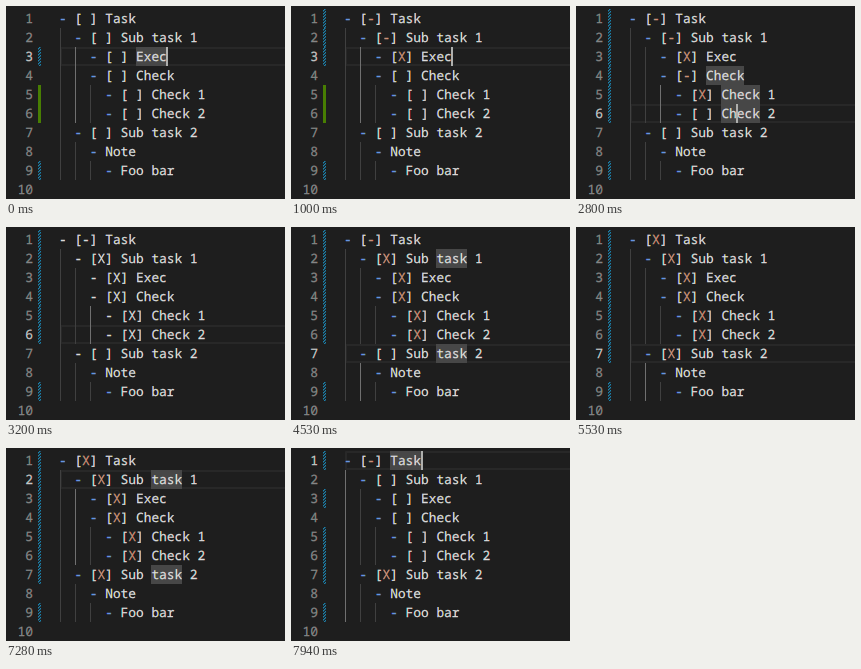
These frames come from a looping animation (279x193 px, 8000 ms). An HTML page with a canvas:

```html
<!DOCTYPE html>
<html lang="en">
<head>
<meta charset="utf-8">
<title>Task list</title>
<style>
  html, body { margin: 0; width: 100%; height: 100%; overflow: hidden; background: #1e1e1e; }
  canvas { display: block; }
</style>
</head>
<body>
<canvas id="stage" width="279" height="193"></canvas>
<script>
const ctx = document.getElementById('stage').getContext('2d');
const LOOP = 8000, W = 279, H = 193;
const TOP = 3, LINE = 19, LEFT = 52.6, CHAR = 7.7;
const INK = [220, 220, 220], BULLET = [103, 150, 230], MARK = [206, 145, 120];
const NUMBER = [133, 133, 133], CURRENT = [198, 198, 198];

// [indent, text, has checkbox]
const lines = [
  [0, 'Task', true],
  [2, 'Sub task 1', true],
  [4, 'Exec', true],
  [4, 'Check', true],
  [6, 'Check 1', true],
  [6, 'Check 2', true],
  [2, 'Sub task 2', true],
  [4, 'Note', false],
  [6, 'Foo bar', false]
];

// Indent guides: [column, first row, last row], outer blocks first
const guides = [[0, 2, 9], [2, 3, 6], [2, 8, 9], [4, 5, 6], [4, 9, 9]];

// Tracks of [start time, value]
const marks = [
  [0, '       '], [400, '--X    '], [1930, '--X-X  '],
  [3200, '-XXXXX '], [4800, 'XXXXXXX'], [7740, '-     X']
];
// m: modified, a: added
const gutter = [
  [0, '..m.aa..m'], [600, 'mmm.aa..m'], [2140, 'mmmmmm..m'],
  [5000, 'mmmmmmm.m'], [7940, 'm.m.mmm.m']
];
const caretRow = [
  [0, 3], [1070, 4], [1270, 5], [2540, 6], [4010, 7],
  [5990, 6], [6210, 5], [6410, 4], [6540, 3], [6740, 2], [7810, 1]
];
const caretOn = [
  [0, true], [470, false], [1000, true], [1730, false], [2260, true],
  [3070, false], [3540, true], [4530, false], [5000, true],
  [5530, false], [5990, true], [7280, false], [7810, true]
];
const highlight = [
  [0, 'Exec'], [400, ''], [1530, 'Check'], [1930, ''], [2800, 'Check'], [3200, ''],
  [4270, 'task'], [4800, ''], [7010, 'task'], [7740, ''], [7940, 'Task']
];
// Edited lines are briefly shown before syntax colours return
const plain = [[0, false], [400, true], [470, false], [3200, true], [3270, false]];

function at(track, t) {
  let value = track[0][1];
  for (const [start, v] of track) if (t >= start) value = v;
  return value;
}

const rowTop = row => TOP + (row - 1) * LINE;
const colX = col => LEFT + col * CHAR;

function rect(x, y, w, h, color) {
  ctx.fillStyle = color;
  ctx.fillRect(x, y, w, h);
}

// Subpixel antialiasing: each colour channel is drawn a third of a pixel apart
function text(str, x, row, color) {
  const y = rowTop(row) + 14;
  ctx.globalCompositeOperation = 'lighten';
  ctx.lineWidth = 0.3;
  color.forEach((level, channel) => {
    const rgb = [0, 0, 0];
    rgb[channel] = level;
    ctx.fillStyle = ctx.strokeStyle = `rgb(${rgb})`;
    const cx = x + (1 - channel) / 3;
    ctx.fillText(str, cx, y);
    ctx.strokeText(str, cx, y);
  });
  ctx.globalCompositeOperation = 'source-over';
}

const code = (str, col, row, color) => text(str, colX(col) + 0.4, row, color);

function drawGutter(kinds) {
  [...kinds].forEach((kind, i) => {
    const y = rowTop(i + 1);
    if (kind === 'a') rect(32, y, 3, LINE, '#487e02');
    if (kind !== 'm') return;
    for (let dy = 0; dy < LINE; dy++) {
      for (let dx = 0; dx < 3; dx++) {
        const phase = (dx + dy) % 3;
        if (phase) rect(32 + dx, y + dy, 1, 1, phase === 1 ? '#1b81a8' : '#1d506a');
      }
    }
  });
}

function drawGuides(row) {
  const active = guides.filter(([, a, b]) => row >= a - 1 && row <= b).pop();
  for (const g of guides) {
    const [col, a, b] = g;
    rect(Math.ceil(colX(col)) + (col < 4 ? 1 : 0), rowTop(a), 1, (b - a + 1) * LINE,
      g === active ? '#707070' : '#404040');
  }
}

function drawHighlight(word) {
  if (!word) return;
  lines.forEach(([indent, str, box], i) => {
    const pos = str.indexOf(word);
    if (pos < 0) return;
    const col = indent + (box ? 6 : 2) + pos;
    const x = Math.round(colX(col));
    rect(x, rowTop(i + 1), Math.round(colX(col + word.length)) - x, LINE, '#474747');
  });
}

function drawLine(i, mark, isPlain) {
  const [indent, str, box] = lines[i];
  const row = i + 1;
  const uncolored = isPlain && box;
  code('-', indent, row, uncolored ? INK : BULLET);
  if (box) {
    code('[', indent + 2, row, INK);
    code(mark, indent + 3, row, uncolored ? INK : MARK);
    code(']', indent + 4, row, INK);
  }
  code(str, indent + (box ? 6 : 2), row, INK);
}

function draw(t) {
  const row = at(caretRow, t), y = rowTop(row);
  rect(0, 0, W, H, '#1e1e1e');
  ctx.font = '12.83px "Noto Sans Mono", "DejaVu Sans Mono", monospace';
  ctx.textRendering = 'geometricPrecision';
  ctx.textBaseline = 'alphabetic';
  ctx.lineJoin = 'round';

  ctx.strokeStyle = '#282828';
  ctx.lineWidth = 2;
  ctx.strokeRect(55, y + 1, W, LINE - 2);
  drawHighlight(at(highlight, t));
  drawGuides(row);
  drawGutter(at(gutter, t));

  for (let n = 1; n <= 10; n++) {
    const label = String(n);
    text(label, 27 - label.length * CHAR, n, n === row ? CURRENT : NUMBER);
  }
  const state = at(marks, t), isPlain = at(plain, t);
  lines.forEach((_, i) => drawLine(i, state[i] || ' ', isPlain));

  if (at(caretOn, t)) {
    const [indent, str] = lines[row - 1];
    const col = Math.min(14, indent + 6 + str.length);
    rect(Math.round(colX(col)), y, 2, LINE, '#aeafad');
  }
}

const begin = performance.now();
function tick() {
  draw((performance.now() - begin) % LOOP);
  requestAnimationFrame(tick);
}
tick();
</script>
</body>
</html>
```
